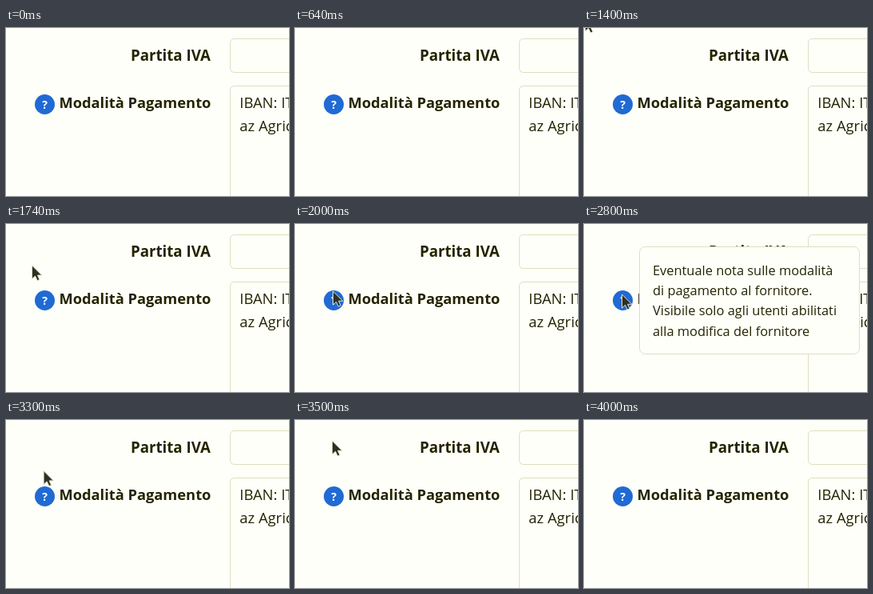
Write an HTML page that moves like this. It is 354 px wide and 210 px high and loops after 5830 ms.

```html
<!DOCTYPE html>
<html lang="it">
<head>
<meta charset="utf-8">
<title>Modalità Pagamento</title>
<style>
  html, body { margin: 0; width: 100%; height: 100%; overflow: hidden; background: #fffffa; }
  svg { display: block; width: 100vw; height: 100vh; }
  text { font-family: "Open Sans", "Noto Sans", sans-serif; fill: #242400; }
  .label { font-size: 18.3px; font-weight: 700; text-anchor: end; }
  .short { font-size: 18.7px; }
  .value { font-size: 18.4px; }
  .note { font-size: 16.4px; }
  .mark { font-size: 14px; font-weight: 700; text-anchor: middle; fill: #fff; }
  .box { fill: #fffffa; stroke: #dedebc; }
</style>
</head>
<body>
<svg viewBox="0 0 354 210">
  <rect width="354" height="210" fill="#fffffa"/>
  <text class="label short" x="256" y="41">Partita IVA</text>
  <text class="label" x="256.4" y="100">Modalità Pagamento</text>
  <rect class="box" x="280.5" y="13.5" width="120" height="42" rx="5"/>
  <rect class="box" x="280.5" y="72.5" width="120" height="190" rx="5"/>
  <text class="value" x="292.3" y="100">IBAN: IT</text>
  <text class="value" x="292.3" y="129">az Agricola</text>
  <circle cx="48.5" cy="95.5" r="12.5" fill="#206ad3"/>
  <text class="mark" x="48.5" y="100.5">?</text>
  <g id="tip">
    <rect class="box" x="69.5" y="28.5" width="275" height="134" rx="7"/>
    <text class="note" x="86" y="64">Eventuale nota sulle modalità</text>
    <text class="note" x="86" y="89">di pagamento al fornitore.</text>
    <text class="note" x="86" y="114">Visibile solo agli utenti abilitati</text>
    <text class="note" x="86" y="140">alla modifica del fornitore</text>
  </g>
  <path id="cursor" d="M0 0V17L4 13.3L6.8 19L9.6 17.8L7 12.3H12.3Z"
        fill="#303022" stroke="#e4e4d4" stroke-width="1" stroke-linejoin="round"/>
</svg>
<script>
  const LOOP = 5830;
  const tip = document.getElementById('tip');
  const cursor = document.getElementById('cursor');

  // time, x, y of the pointer's hot spot
  const path = [
    [1340, -4, -20], [1400, 1.5, -13], [1640, 24, 36], [1900, 46, 77],
    [2000, 47.5, 84], [2200, 47.5, 88], [3170, 47.5, 88],
    [3500, 46.5, 26], [3740, 45.5, -21]
  ];
  // time, opacity held until the next entry
  const fade = [[0, 0], [2370, 0.5], [2400, 1], [3200, 0.5], [3240, 0]];

  function pointAt(t) {
    const i = path.findIndex(p => p[0] > t);
    if (i < 1) return null;
    const [t0, x0, y0] = path[i - 1], [t1, x1, y1] = path[i];
    const k = (t - t0) / (t1 - t0);
    return [x0 + (x1 - x0) * k, y0 + (y1 - y0) * k];
  }

  function draw(t) {
    const p = pointAt(t);
    cursor.style.display = p ? '' : 'none';
    if (p) cursor.setAttribute('transform', `translate(${p[0]} ${p[1]})`);
    tip.setAttribute('opacity', fade.filter(f => f[0] <= t).pop()[1]);
  }

  let start;
  function tick(now) {
    start ??= now;
    draw(Math.max(0, now - start) % LOOP);
    requestAnimationFrame(tick);
  }
  draw(0);
  requestAnimationFrame(tick);
</script>
</body>
</html>
```
